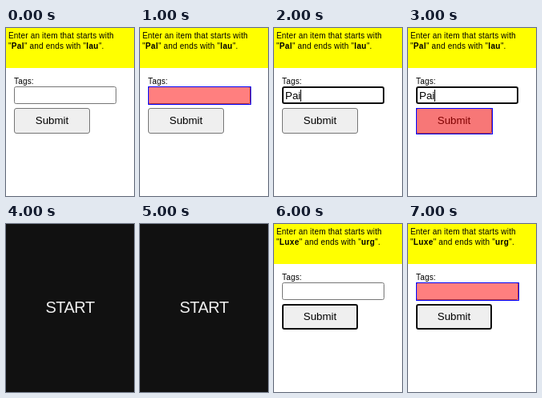
Write an HTML page that moves like this. It is 160 px wide and 210 px high and loops after 8000 ms.

```html
<!DOCTYPE html>
<html lang="en">
<head>
<meta charset="utf-8">
<title>Autocomplete form</title>
<style>
  html, body { margin: 0; width: 100%; height: 100%; overflow: hidden; background: #fff; }
  #stage {
    position: absolute; left: 0; top: 0; width: 160px; height: 210px; overflow: hidden;
    background: #fff; color: #000; white-space: nowrap;
    font: 10px/13px "Liberation Sans", Arial, sans-serif;
  }
  #stage div { position: absolute; box-sizing: border-box; }
  #query { left: 0; top: 0; width: 160px; height: 50px; padding: 3px; background: #ff0; }
  #query, #label { letter-spacing: .17px; }
  #query b { letter-spacing: .4px; }
  #label { left: 10px; top: 60px; }
  .box { left: 10px; border: 1px solid #767676; border-radius: 2.5px; }
  #button { top: 100px; width: 95px; height: 32px; border-radius: 3px; background: #efefef; }
  #field { top: 73px; width: 128px; height: 22px; background: #fff; }
  .box.focus { border: 2px solid #101010; border-radius: 3px; }
  #typed, #submit { font-size: 13.3333px; line-height: 15px; }
  #typed { left: 14px; top: 77px; }
  #caret { left: 33px; top: 77px; width: 1px; height: 15px; background: #000; }
  #submit { left: 10px; top: 108px; width: 95px; text-align: center; }
  #mark { left: 10px; background: rgba(255, 0, 0, .5); background-clip: padding-box; border: 1px solid #00f; }
  #mark.field { top: 73px; width: 129px; height: 23px; }
  #mark.button { top: 100px; width: 96px; height: 33px; }
  #cover {
    left: 0; top: 0; width: 160px; height: 210px; background: #111; color: #eee;
    font-size: 20px; line-height: 208px; letter-spacing: -.5px; text-align: center;
  }
</style>
</head>
<body>
<div id="stage">
  <div id="query">Enter an item that starts with<br>"<b id="head"></b>" and ends with "<b id="tail"></b>".</div>
  <div id="label">Tags:</div>
  <div id="field" class="box"></div>
  <div id="typed"></div>
  <div id="caret"></div>
  <div id="button" class="box"></div>
  <div id="submit">Submit</div>
  <div id="mark"></div>
  <div id="cover">START</div>
</div>
<script>
  const STEP = 1000;
  const first = { head: "Pal", tail: "lau" };
  const second = { head: "Luxe", tail: "urg", focus: "button" };
  const typed = { ...first, typed: "Pai", focus: "field" };
  const start = { ...second, cover: true };

  const steps = [
    first,
    { ...first, mark: "field" },
    typed,
    { ...typed, mark: "button" },
    start,
    start,
    second,
    { ...second, mark: "field" }
  ];

  const el = id => document.getElementById(id);
  const show = (id, on) => { el(id).style.display = on ? "block" : "none"; };
  let current = -1;

  function render(ms) {
    const i = Math.floor(ms / STEP) % steps.length;
    if (i === current) return;
    current = i;
    const s = steps[i];
    el("head").textContent = s.head;
    el("tail").textContent = s.tail;
    el("typed").textContent = s.typed || "";
    for (const id of ["field", "button"]) el(id).classList.toggle("focus", s.focus === id);
    el("mark").className = s.mark || "";
    show("caret", s.typed);
    show("mark", s.mark);
    show("cover", s.cover);
  }

  const origin = performance.now();
  function tick() {
    render(performance.now() - origin);
    requestAnimationFrame(tick);
  }
  tick();
</script>
</body>
</html>
```
